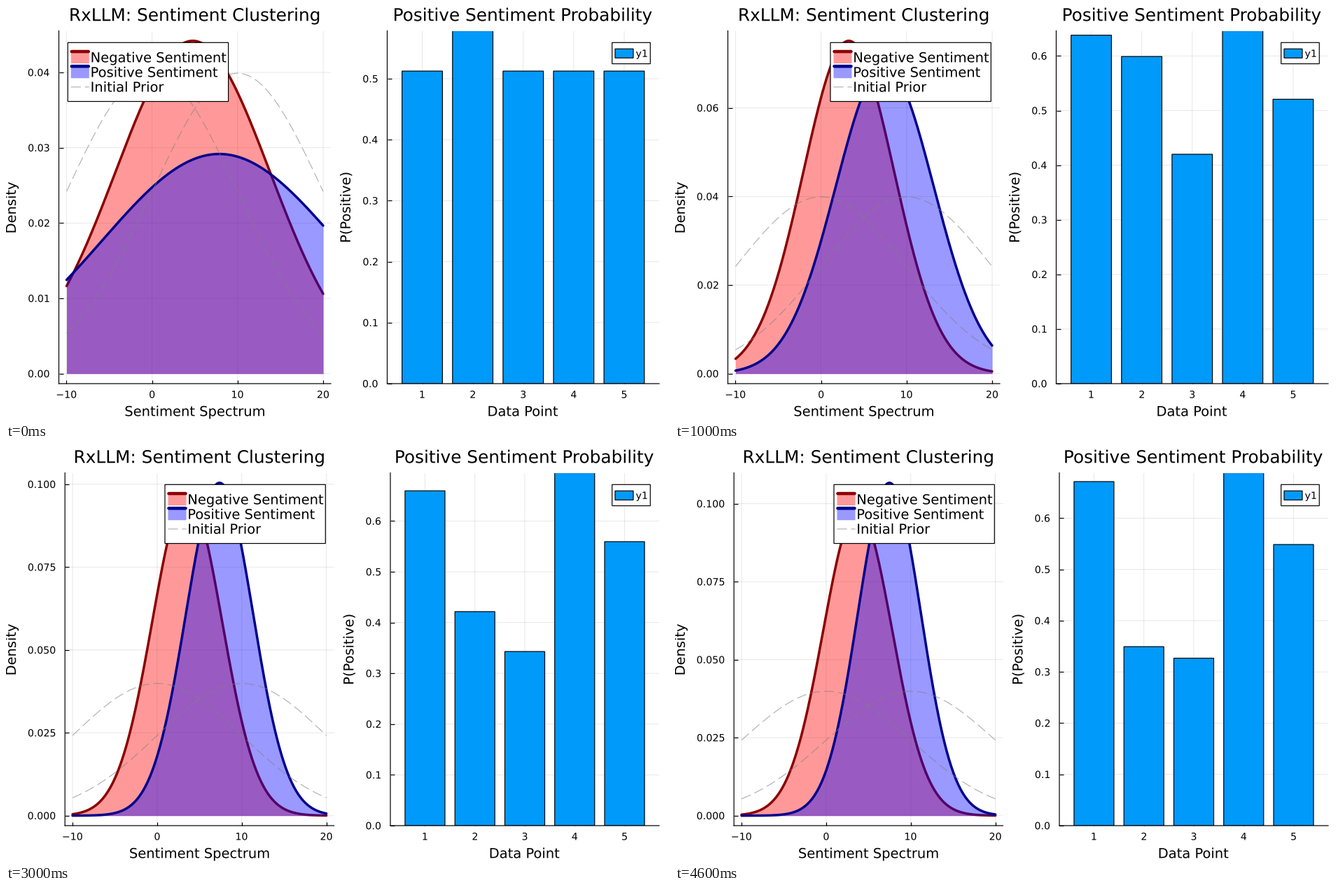
These frames come from a looping animation (947 px wide and 592 px high, 5000 ms). A matplotlib script:

```python
import numpy as np
import matplotlib.pyplot as plt
from matplotlib.animation import FuncAnimation
from matplotlib.patches import PathPatch, Rectangle
from matplotlib.textpath import TextPath
from matplotlib.transforms import Affine2D

W, H = 947, 592
TOP, BOTTOM = 35.5, 540
PX = 0.72  # points per pixel at 100 dpi
TICK, LABEL, TITLE = (n * 1.771 for n in (8, 11, 14))  # pixels
SERIES = (("darkred", "red"), ("darkblue", "blue"))
PRIOR = dict(color="gray", alpha=0.6, lw=1.2 * PX, ls=(0, (14 * PX, 6 * PX)))
EDGE = dict(ec="black", lw=1.2 * PX)

plt.rcParams.update({"font.family": "DejaVu Sans", "path.snap": False,
                     "lines.solid_capstyle": "round",
                     "lines.scale_dashes": False})

# (mean, sigma) of both clusters, P(positive) per point, tick step and decimals
STEPS = [
    dict(neg=(4.75, 9.026), pos=(7.85, 13.676), step=0.01, digits=2,
         prob=(0.5126, 0.5786, 0.5126, 0.5126, 0.5126), pstep=0.1),
    dict(neg=(3.24, 5.309), pos=(7.44, 5.74), step=0.02, digits=2,
         prob=(0.638, 0.599, 0.42, 0.646, 0.5207), pstep=0.1),
    dict(neg=(3.43, 4.554), pos=(7.42, 4.575), step=0.02, digits=2,
         prob=(0.6393, 0.4252, 0.3713, 0.7056, 0.5472), pstep=0.2),
    dict(neg=(3.55, 4.12), pos=(7.37, 3.972), step=0.025, digits=3,
         prob=(0.6596, 0.4216, 0.343, 0.695, 0.5594), pstep=0.1),
    dict(neg=(3.73, 4.07), pos=(7.47, 3.739), step=0.025, digits=3,
         prob=(0.6714, 0.3493, 0.3268, 0.6885, 0.5486), pstep=0.1),
]

fig = plt.figure(figsize=(W / 100, H / 100), dpi=100, facecolor="white")
xs = np.linspace(-10, 20, 601)


def normal(mean, sigma):
    return np.exp(-((xs - mean) / sigma) ** 2 / 2) / (sigma * np.sqrt(2 * np.pi))


def make_page():
    """Overlay in pixel units, y pointing down."""
    page = fig.add_axes([0, 0, 1, 1], zorder=5)
    page.set(xlim=(0, W), ylim=(H, 0))
    page.axis("off")
    return page


def write(page, x, y, text, size, align=0.0, angle=0):
    """Text outline at a baseline point; align 0 is left, 0.5 centre, 1 right."""
    path = TextPath((0, 0), text, size=size)
    ink = path.get_extents()
    shift = align * (ink.x0 + ink.x1)
    place = Affine2D().translate(-shift, 0).scale(1, -1)
    place.rotate_deg(-angle).translate(x, y)
    page.add_patch(PathPatch(place.transform_path(path), fc="black", lw=0, zorder=3))


def make_plot(page, left, right, xlim, ylim, xticks, yticks, digits):
    ax = fig.add_axes([left / W, 1 - BOTTOM / H,
                       (right - left) / W, (BOTTOM - TOP) / H])
    ax.set(xlim=xlim, ylim=ylim, xticks=xticks, yticks=yticks)
    ax.patch.set_visible(False)
    ax.set_axisbelow(True)
    ax.spines[["top", "right"]].set_visible(False)
    ax.spines[["left", "bottom"]].set_linewidth(1.2 * PX)
    ax.tick_params(direction="in", length=5.5 * PX, width=1.2 * PX,
                   labelleft=False, labelbottom=False)
    ax.grid(color="black", alpha=0.1, linewidth=0.9 * PX)
    for t in xticks:
        x = left + (right - left) * (t - xlim[0]) / (xlim[1] - xlim[0])
        write(page, x, 560.5, f"{t}".replace("-", "\u2212"), TICK, 0.5)
    for t in yticks:
        y = BOTTOM - (BOTTOM - TOP) * (t - ylim[0]) / (ylim[1] - ylim[0])
        write(page, left - 13, y + 5.2, f"{t:.{digits}f}", TICK, 1)
    return ax


def captions(page, left, right, title, xlabel, ylabel, ylabel_x):
    mid = (left + right) / 2
    write(page, mid, 21.3, title, TITLE, 0.5)
    write(page, mid, 586.3, xlabel, LABEL, 0.5)
    write(page, ylabel_x, (TOP + BOTTOM) / 2, ylabel, LABEL, 0.5, angle=90)


def box(page, x0, y0, x1, y1, **style):
    page.add_patch(Rectangle((x0, y0), x1 - x0, y1 - y0, **style))


def density_legend(page, x):
    box(page, x, 52.3, x + 229.3, 136.5, fc="white", **EDGE)
    names = ("Negative Sentiment", "Positive Sentiment", "Initial Prior")
    for i, name in enumerate(names):
        y = 73.6 + 21.1 * i
        write(page, x + 32.3, y + 6.8, name, LABEL)
        if i < 2:
            line, fill = SERIES[i]
            box(page, x + 4.5, y - 8.5, x + 30.5, y + 8.5, fc=fill, alpha=0.4, lw=0)
            page.plot([x + 5.5, x + 29.5], [y - 8.5] * 2, color=line, lw=4.6 * PX)
        else:
            page.plot([x + 4.5, x + 30.5], [y] * 2, **PRIOR)


def draw_density(page, s, left, right, legend_x):
    curves = [normal(*s["neg"]), normal(*s["pos"])]
    peak = max(c.max() for c in curves)
    pad = 0.03 * peak
    yticks = np.arange(0, peak + pad, s["step"])
    ax = make_plot(page, left, right, (-10.9, 20.9), (-pad, peak + pad),
                   (-10, 0, 10, 20), yticks, s["digits"])
    for c, (line, fill) in zip(curves, SERIES):
        ax.fill_between(xs, c, color=fill, alpha=0.4, lw=0, zorder=2)
        ax.plot(xs, c, color=line, lw=3.5 * PX, zorder=2)
    for mean in (0, 10):
        ax.plot(xs, normal(mean, 10), zorder=2, **PRIOR)
    captions(page, left, right, "RxLLM: Sentiment Clustering",
             "Sentiment Spectrum", "Density", 14)
    density_legend(page, legend_x)


def draw_bars(page, s, left, right, ylabel_x):
    top = max(s["prob"])
    ax = make_plot(page, left, right, (0.306, 5.694), (0, top),
                   range(1, 6), np.arange(0, top, s["pstep"]), 1)
    ax.bar(range(1, 6), s["prob"], width=0.8, color="#009AFA", zorder=2, **EDGE)
    captions(page, left, right, "Positive Sentiment Probability",
             "Data Point", "P(Positive)", ylabel_x)
    box(page, 865.7, 52.3, 920.3, 82.6, fc="white", **EDGE)
    box(page, 870, 61.3, 896, 74.3, fc="#009AFA", **EDGE)
    write(page, 899.5, 72.8, "y1", TICK)


def draw(i):
    fig.clear()
    page = make_page()
    s = STEPS[i]
    wide = s["digits"] == 3  # longer tick labels push the plots right
    if wide:
        draw_density(page, s, 84.2, 468.5, 227)
        draw_bars(page, s, 549, 933, 496.3)
    else:
        draw_density(page, s, 75.5, 464, 88.3 if i == 0 else 222)
        draw_bars(page, s, 544.5, 933, 491.8)
    return []


anim = FuncAnimation(fig, draw, frames=len(STEPS), init_func=lambda: [],
                     interval=1000, repeat=True, repeat_delay=0, blit=False)
plt.show()
```
